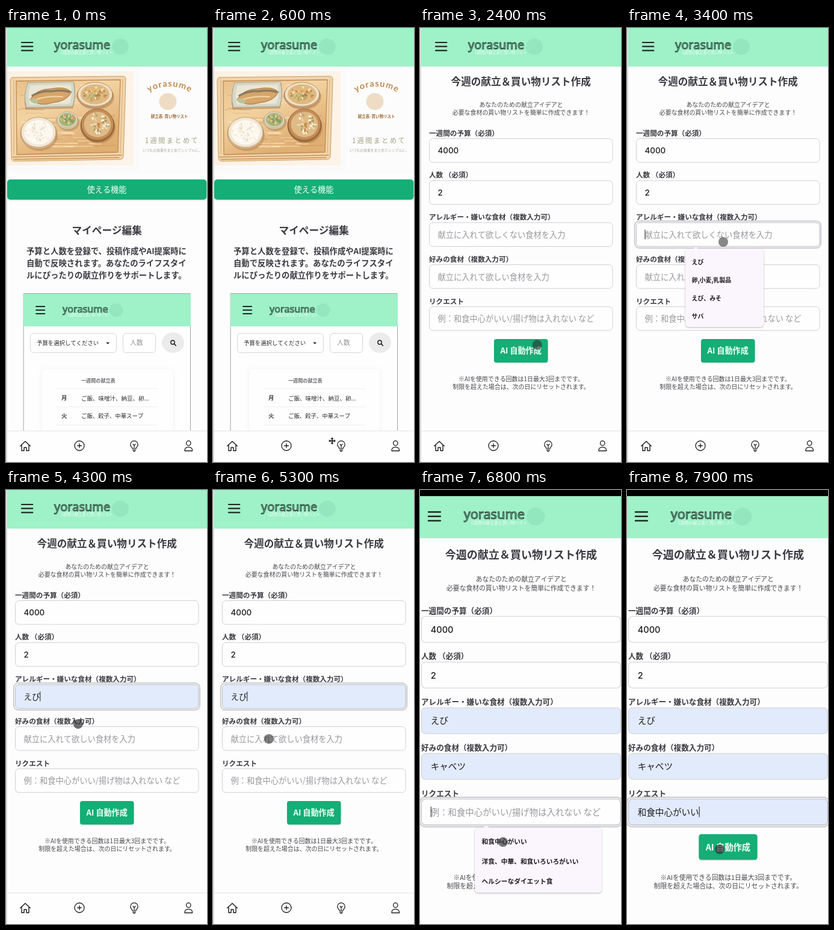
An HTML page with a canvas for the animation above (8 s loop, 334 by 720 pixels).

```html
<!DOCTYPE html>
<html lang="ja">
<head>
<meta charset="utf-8">
<title>yorasume</title>
<style>
html, body { margin: 0; width: 100%; height: 100%; overflow: hidden; background: #fdfdfd; }
canvas { display: block; width: 334px; height: 720px; }
</style>
</head>
<body>
<canvas id="stage"></canvas>
<script>
const W = 334, H = 720, LOOP = 8000;
const BRAND = 'yorasume';
const JP = '"Noto Sans CJK JP", "Noto Sans CJK", sans-serif';
const LATIN = 'Inter, sans-serif';
const MINT = '#9ff1c8', GREEN = '#14ae76', INK = '#3a3a42', SOFT = '#47474d';
const canvas = document.getElementById('stage');
const ctx = canvas.getContext('2d');
const dpr = window.devicePixelRatio || 1;
canvas.width = W * dpr;
canvas.height = H * dpr;

// ---------- helpers ----------
function rect(x, y, w, h, color) {
  ctx.fillStyle = color;
  ctx.fillRect(x, y, w, h);
}

function box(x, y, w, h, r, fill, stroke, lw = 1) {
  ctx.beginPath();
  ctx.roundRect(x, y, w, h, r);
  if (fill) { ctx.fillStyle = fill; ctx.fill(); }
  if (stroke) { ctx.strokeStyle = stroke; ctx.lineWidth = lw; ctx.stroke(); }
}

function oval(x, y, rx, ry, fill, stroke, lw = 1, rot = 0) {
  ctx.beginPath();
  ctx.ellipse(x, y, rx, ry, rot, 0, Math.PI * 2);
  if (fill) { ctx.fillStyle = fill; ctx.fill(); }
  if (stroke) { ctx.strokeStyle = stroke; ctx.lineWidth = lw; ctx.stroke(); }
}

function setFont(s, size, weight) {
  ctx.font = `${weight} ${size}px ${/^\d+$/.test(s) ? LATIN : JP}`;
}

// y is the visual middle of the line
function text(s, x, y, size, color = INK, weight = 400, align = 'left', spacing = 0) {
  setFont(s, size, weight);
  ctx.letterSpacing = spacing + 'px';
  ctx.textAlign = align;
  ctx.fillStyle = color;
  ctx.fillText(s, x, y + size * 0.37);
  ctx.letterSpacing = '0px';
}

function path(d, color, lw, fill) {
  const p = new Path2D(d);
  if (fill) { ctx.fillStyle = fill; ctx.fill(p); }
  ctx.strokeStyle = color;
  ctx.lineWidth = lw;
  ctx.lineCap = ctx.lineJoin = 'round';
  ctx.stroke(p);
}

function withShadow(color, blur, dy, draw) {
  ctx.save();
  ctx.shadowColor = color;
  ctx.shadowBlur = blur * dpr;
  ctx.shadowOffsetY = dy * dpr;
  draw();
  ctx.restore();
}

function random(seed) {
  return () => (seed = (seed * 16807) % 2147483647) / 2147483647;
}

// ---------- shared parts ----------
function header() {
  rect(0, 0, W, 64, MINT);
  path('M26 24H44.3M26 30.7H44.3M26 37.4H44.3', '#1b2b24', 2.2);
  logo(80, 35, 20);
  text('1週間の献立表と買い物リスト', 91, 40.5, 6.4, 'rgba(255,255,255,.85)');
  oval(190, 31, 14, 13.5, '#93e7bf');
}

function logo(x, y, size) {
  ctx.font = `400 ${size}px "Noto Sans", "Open Sans", sans-serif`;
  ctx.textAlign = 'left';
  ctx.lineJoin = 'round';
  ctx.strokeStyle = '#22382e';
  ctx.lineWidth = size * 0.045;
  ctx.fillStyle = '#84c9a8';
  ctx.fillText(BRAND, x, y);
  ctx.strokeText(BRAND, x, y);
}

function nav() {
  rect(0, 668, W, 80, '#fefefe');
  rect(0, 668, W, 1, '#e4e4e4');
  const c = '#1c1c1e';
  path('M23.7 693.5L32 685.7L40.3 693.5M26 692V701.3H30V696H34V701.3H38V692', c, 1.4);
  oval(122, 693, 8, 8, null, c, 1.3);
  path('M118.7 693H125.3M122 689.7V696.3', c, 1.3);
  path('M209.8 698V696.2C208 695 206.8 693.2 206.8 691A6.2 6.2 0 0 1 219.2 691C219.2 693.2 218 695 216.2 696.2V698ZM210.5 700.3H215.5M211.5 702.3H214.5M213 697V692M211 690.5L213 692.5L215 690.5', c, 1.2);
  oval(303.3, 688.8, 3.7, 3.9, null, c, 1.3);
  path('M297 701.5V700.5C297 693.6 309.6 693.6 309.6 700.5V701.5Z', c, 1.3);
}

// ---------- home page ----------
function tray(rnd) {
  const wood = ctx.createLinearGradient(0, 80, 60, 220);
  wood.addColorStop(0, '#e6bd86');
  wood.addColorStop(0.5, '#f3d3a2');
  wood.addColorStop(1, '#dfae72');
  path('M12 82L194 80Q199 80 199 85L195 212Q195 218 189 218L15 221Q9 221 9 215L7 87Q7 82 12 82Z', '#cb9a62', 1, '#f0d5ab');
  path('M17 88L190 86L186 206L18 210Z', '#c08a50', 1.3, wood);
  path('M11 214L192 211M13 218L188 215', '#c9935a', 1.6);
  path('M13 86V209M194 86L190 207', '#dfb684', 1.4);
  for (let i = 0; i < 46; i++) {
    const x = 20 + rnd() * 120, y = 90 + rnd() * 112;
    const tone = rnd() < 0.6 ? 'rgba(255,237,206,.5)' : 'rgba(176,112,56,.2)';
    rect(x, y, 15 + rnd() * 35, 1 + rnd() * 2, tone);
  }
}

function bowl(x, y, rx, ry, wall, edge, rim, inner) {
  oval(x + 2, y + 5, rx, ry, 'rgba(140,84,38,.28)');
  oval(x, y + 2, rx, ry, wall, edge, 0.8);
  oval(x, y, rx - 1, ry - 1, rim, edge, 0.7);
  oval(x, y, rx * 0.8, ry * 0.78, inner);
}

function meal() {
  const paper = ctx.createLinearGradient(2, 0, 213, 0);
  paper.addColorStop(0, '#fdf1e3');
  paper.addColorStop(1, '#fdf3e8');
  rect(2, 72, 210, 156, paper);
  const rnd = random(41);
  tray(rnd);

  // grilled fish
  path('M36 93L113 91Q117 111 111 133L33 135Q28 113 36 93Z', 'rgba(140,84,38,.3)', 1, 'rgba(140,84,38,.3)');
  path('M36 91L112 89Q117 110 111 130L34 132Q28 112 36 91Z', '#a9a48c', 1, '#d3d8c8');
  path('M40 95L108 93Q112 110 106 126L39 128Q34 112 40 95Z', '#d9d4bd', 1, '#ebe6d4');
  path('M40 119Q50 101 74 101Q98 96 109 106Q101 122 77 124Q56 131 40 119Z', '#9a7247', 1, '#d8a568');
  path('M44 112Q60 103 76 105Q92 102 105 106', '#8b7a60', 3.5);
  path('M49 119Q67 112 94 114', '#f2d3a0', 2.2);
  oval(47, 121, 7, 4, '#b9c39a', null, 1, 0.3);

  bowl(148, 110, 30, 21, '#cfa172', '#a0744a', '#ede0c6', '#e0b87e');
  bowl(102, 152, 18, 14, '#d9cbab', '#a8946d', '#e7dfca', '#a9b277');
  bowl(54, 173, 30, 26, '#d9b68c', '#b08a60', '#f1e7d3', '#fdf8ee');
  bowl(152, 160, 28, 27, '#a3703f', '#8a5a30', '#c48e59', '#dfba85');

  const sprinkle = (x, y, rx, ry, n, colors) => {
    for (let i = 0; i < n; i++) {
      const a = rnd() * 6.28, d = Math.sqrt(rnd());
      oval(x + Math.cos(a) * d * rx, y + Math.sin(a) * d * ry, 1 + rnd() * 2.4, 0.8 + rnd() * 1.4,
        colors[i % colors.length], null, 1, a);
    }
  };
  sprinkle(148, 109, 19, 12, 40, ['#cb985a', '#f3dda9', '#b8814a', '#a9b277']);
  sprinkle(102, 151, 12, 9, 30, ['#7f9d60', '#ced39c', '#dd9763']);
  sprinkle(54, 172, 22, 17, 46, ['#f3ead8', '#ffffff', '#eadfca']);
  sprinkle(152, 159, 18, 17, 40, ['#f9eed8', '#f0d9b0', '#97a26c', '#c28b50', '#fff9ec']);
}

function heroTitle() {
  rect(221, 66, 113, 170, '#fcfcfc');
  const R = 66, cx = 271.5, cy = 163, gap = 1.2;
  ctx.font = '700 14.5px Lato, sans-serif';
  ctx.textAlign = 'center';
  ctx.fillStyle = '#c08a50';
  const widths = [...BRAND].map(ch => ctx.measureText(ch).width + gap);
  let pos = -widths.reduce((a, b) => a + b) / 2;
  [...BRAND].forEach((ch, i) => {
    ctx.save();
    ctx.translate(cx, cy);
    ctx.rotate((pos + widths[i] / 2) / R);
    ctx.fillText(ch, 0, -R);
    ctx.restore();
    pos += widths[i];
  });
  oval(269, 122, 14.5, 14, '#efdcc5');
  text('献立表･買い物リスト', 271.5, 147, 6.5, '#9b6a35', 700, 'center');
  text('1週間まとめて', 231, 186.5, 11.2, '#a3a283', 400, 'left', 2.4);
  text('いつもの食事をまとめてシンプルに。', 227, 202.5, 5.8, '#a9a88c');
}

function preview() {
  ctx.save();
  ctx.beginPath();
  ctx.rect(28, 439, 281, 229);
  ctx.clip();
  box(29.5, 440.5, 277, 260, 0, '#fefefe', '#a3a7a5');
  rect(29, 441, 278, 54, MINT);
  path('M50 462H64.3M50 468H64.3M50 474H64.3', '#1b2b24', 1.8);
  logo(94, 472, 16.2);
  text('1週間の献立表と買い物リスト', 103, 476.5, 5.2, 'rgba(255,255,255,.8)');
  oval(183, 468, 11.5, 11, '#93e7bf');

  box(40.5, 506.5, 143, 32, 5, '#fff', '#d6d6d9');
  text('予算を選択してください', 51, 522.5, 9.4, '#222', 500);
  path('M167 522L169.2 524.3L171.4 522Z', '#222', 0.6, '#222');
  box(194.5, 506.5, 54, 32, 5, '#fff', '#d6d6d9');
  text('人数', 206, 522.5, 10.8, '#929298');
  oval(277.5, 522, 18.5, 17, '#ebebeb');
  oval(277, 521.5, 3.2, 3.2, null, '#161616', 1.4);
  path('M279.5 524L282.3 527', '#161616', 1.6);

  withShadow('rgba(0,0,0,.06)', 6, 1, () => box(60, 566, 217, 130, 4, '#fefefe'));
  text('一週間の献立表', 125, 585, 8.1, '#6c6c72', 700);
  rect(83, 598, 170, 1, '#efefef');
  text('月', 92, 614, 9.4, INK, 700);
  text('ご飯、味噌汁、納豆、卵...', 125, 614, 9.5, '#2a2a30', 500);
  rect(83, 628, 170, 1, '#efefef');
  text('火', 92, 644, 9.4, INK, 700);
  text('ご飯、餃子、中華スープ', 125, 644, 9.4, '#2a2a30', 500);
  rect(83, 658, 170, 1, '#efefef');
  ctx.restore();
}

function homePage() {
  rect(2, 64, W, 176, '#fafafa');
  meal();
  heroTitle();
  withShadow('rgba(0,0,0,.15)', 2, 1, () => box(2, 251.3, 331.3, 33.4, 5, GREEN));
  text('使える機能', 167.5, 268, 13.2, '#f3fff9', 500, 'center');
  text('マイページ編集', 167.7, 336, 16.6, INK, 600, 'center');
  ['予算と人数を登録で、投稿作成やAI提案時に',
   '自動で反映されます。あなたのライフスタイ',
   'ルにぴったりの献立作りをサポートします。'
  ].forEach((s, i) => text(s, 34, 370.5 + i * 20, 13.35, INK, 600));
  preview();
}

// ---------- form page ----------
const FIELDS = [
  { label: '一週間の予算（必須）', value: '4000' },
  { label: '人数 （必須）', value: '2' },
  { label: 'アレルギー・嫌いな食材（複数入力可）', value: 'えび', hint: '献立に入れて欲しくない食材を入力',
    focus: 3000, pick: 4200, blur: 5400, options: ['えび', '卵,小麦,乳製品', 'えび、みそ', 'サバ'], menuW: 130 },
  { label: '好みの食材（複数入力可）', value: 'キャベツ', hint: '献立に入れて欲しい食材を入力',
    focus: 5400, pick: 5700, blur: 5850, options: ['キャベツ'], menuW: 130 },
  { label: 'リクエスト', value: '和食中心がいい', hint: '例：和食中心がいい/揚げ物は入れない など',
    focus: 5850, pick: 6850, blur: LOOP, options: ['和食中心がいい', '洋食、中華、和食いろいろがいい', 'ヘルシーなダイエット食'], menuW: 194 }
];
const CLEAR = 1900;
const VALUE_SIZE = 13.4;
const fieldTop = i => 183.5 + i * 69.7;

function field(f, i, t) {
  const y = fieldTop(i);
  const picked = f.hint && t >= f.pick;
  const filled = !f.hint || t < CLEAR || picked;
  const active = f.hint && t >= f.focus && t < f.blur;
  text(f.label, 15, y - 9, 11.6, INK, 600);
  if (active) box(12.8, y - 2.7, 309.4, 44.9, 8, null, '#cdcdd1', 2);
  box(15.5, y, 304.5, 39.5, 6, picked ? '#e1ebfc' : '#fefefe', active ? '#b8bac2' : '#d1d1d4');
  if (filled) text(f.value, 29.5, y + 20, VALUE_SIZE, '#1b1b1f', 500);
  else text(f.hint, 29.5, y + 20, 13.25, '#98989d');
  if (active) {
    setFont(f.value, VALUE_SIZE, 500);
    const x = 29.5 + (filled ? ctx.measureText(f.value).width : 0);
    rect(x, y + 11.5, 1, 16, '#222');
  }
}

function menu(f, i) {
  const top = fieldTop(i) + 44, h = f.options.length * 30 + 9;
  withShadow('rgba(0,0,0,.28)', 3, 1, () => box(97, top, f.menuW, h, 5, '#fbf6fd'));
  path(`M110 ${top}L114.5 ${top - 3.5}L119 ${top}Z`, '#fbf6fd', 0.5, '#fbf6fd');
  f.options.forEach((s, k) => text(s, 107.5, top + 21 + k * 30, 9.9, '#1d1b20', 600));
}

function formPage(t) {
  text('今週の献立＆買い物リスト作成', 167.7, 89, 16.6, INK, 600, 'center');
  text('あなたのための献立アイデアと', 168, 127, 9.95, SOFT, 400, 'center');
  text('必要な食材の買い物リストを簡単に作成できます！', 168, 140.5, 9.95, SOFT, 400, 'center');
  FIELDS.forEach((f, i) => field(f, i, t));
  withShadow('rgba(0,0,0,.15)', 2, 1, () => box(123, 516, 89.5, 39, 4, GREEN));
  text('AI 自動作成', 167.7, 535.5, 13.2, '#f2fff9', 700, 'center');
  text('※AIを使用できる回数は1日最大3回までです。', 168, 582, 9.95, SOFT, 400, 'center');
  text('制限を超えた場合は、次の日にリセットされます。', 168, 595, 9.95, SOFT, 400, 'center');
  FIELDS.forEach((f, i) => {
    if (f.hint && t >= f.focus && t < f.pick) menu(f, i);
  });
}

// ---------- pointer ----------
// time, x, y, darkness
const TRACK = [
  [400, 192, 676, .7], [600, 198, 685, .7], [900, 212, 692, .7],
  [1700, 212, 692, .7], [2700, 190, 480, .6], [3100, 160, 350, .58],
  [3400, 160, 355, .58], [4050, 122, 388, .58], [4250, 120, 388, .7],
  [5300, 93, 413, .62], [5450, 93, 456, .65], [5650, 116, 507, .7],
  [5850, 113, 538, .64], [6200, 113, 538, .64], [6700, 138, 584, .62],
  [6900, 138, 584, .7], [7600, 154, 596, .7], [LOOP, 154, 596, .7]
];

function pointer(t) {
  if (t < TRACK[0][0]) return;
  const i = Math.max(1, TRACK.findIndex(k => k[0] > t));
  const a = TRACK[i - 1], b = TRACK[i];
  const u = (t - a[0]) / (b[0] - a[0]), e = u * u * (3 - 2 * u);
  const [x, y, dark] = [1, 2, 3].map(n => a[n] + (b[n] - a[n]) * e);
  if (t >= 900) {
    oval(x, y, 8, 8, `rgba(48,48,50,${dark})`);
    return;
  }
  ctx.save();
  ctx.translate(x, y);
  for (let k = 0; k < 4; k++) {
    path('M0 0V-3.5', '#111', 1.5);
    path('M-1.8 -3.6L0 -5.6L1.8 -3.6Z', '#111', 0.6, '#111');
    ctx.rotate(Math.PI / 2);
  }
  ctx.restore();
}

// ---------- frame ----------
function draw(t) {
  ctx.setTransform(dpr, 0, 0, dpr, 0, 0);
  const zoomed = t >= 5400;
  rect(0, 0, W, H, zoomed ? '#000' : '#fdfdfd');
  ctx.save();
  if (zoomed) {
    ctx.translate(-14.3, 10.4);
    ctx.scale(1.0866, 1.0866);
  }
  rect(0, 0, W, H, '#fdfdfd');
  header();
  if (t < 1000) homePage();
  else formPage(t);
  nav();
  rect(0, 0, 2, H, '#dedee0');
  ctx.restore();
  pointer(t);
}

const start = performance.now();
function tick() {
  draw((performance.now() - start) % LOOP);
  requestAnimationFrame(tick);
}
tick();
</script>
</body>
</html>
```
